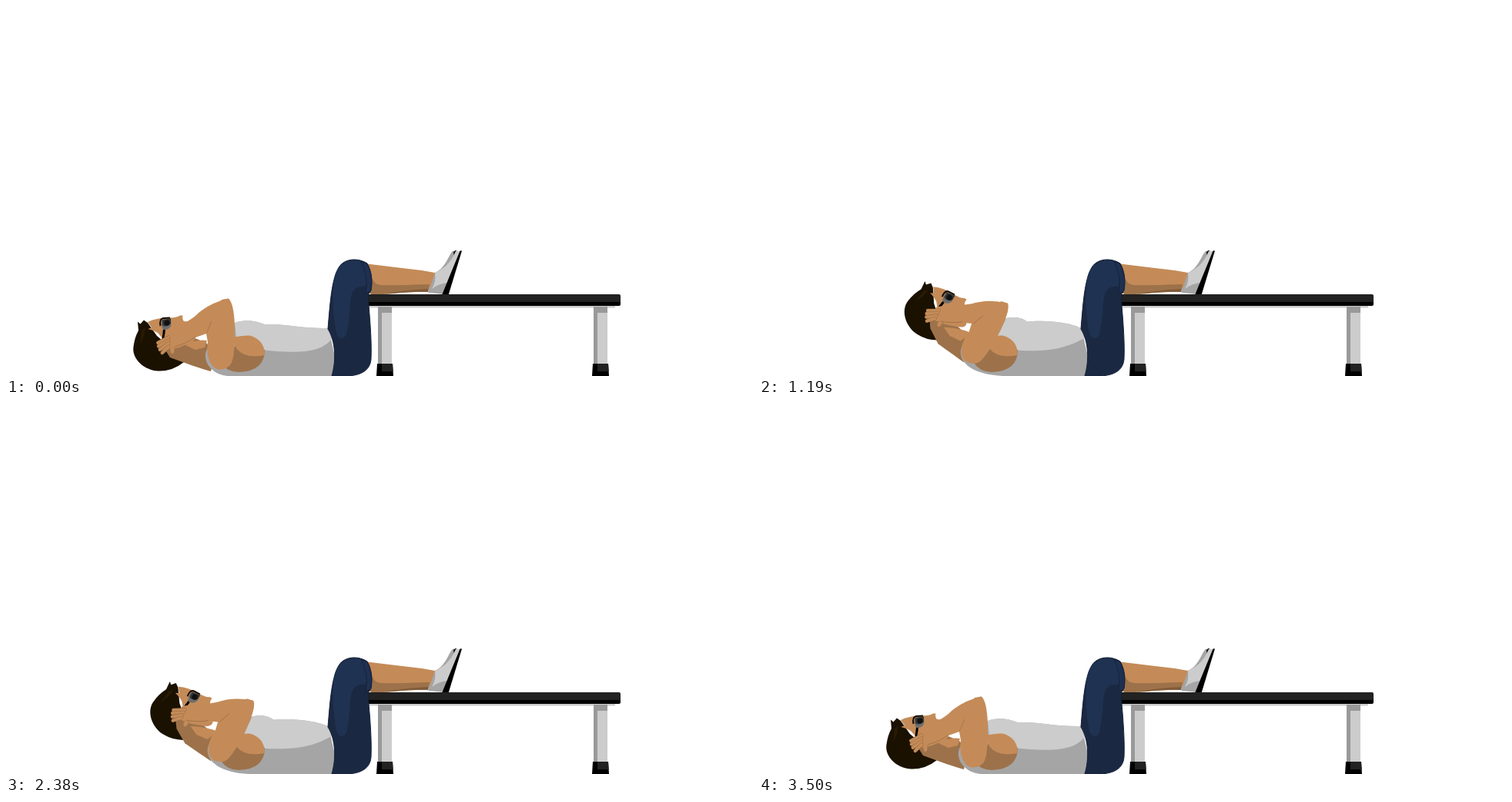
An HTML page for the animation above (3570 ms loop, 970 by 480 pixels).

```html
<!DOCTYPE html>
<html lang="en">
<head>
<meta charset="utf-8">
<title>Crunch with legs on a bench</title>
<style>
html, body { margin: 0; width: 100%; height: 100%; overflow: hidden; background: #fff; }
svg { display: block; width: 970px; height: 480px; }
.skin { fill: #c48b58; }
.shade { fill: #9d724a; }
.crease { fill: none; stroke: #8f6440; stroke-width: .6; }
</style>
</head>
<body>
<svg viewBox="0 0 970 480" xmlns="http://www.w3.org/2000/svg">
  <defs>
    <g id="post">
      <path fill="#ccc" d="M483 390h18v75h-18z"/>
      <path fill="#999" d="M483 390h18v8h-13v67h-5z"/>
      <path fill="#000" d="M482 464h20l1 16h-22z"/>
      <path fill="#222" d="M488 464h14l.6 10h-14.6z"/>
    </g>
  </defs>

  <g id="hair">
    <path fill="#1a1100" d="M231 462Q216 474 198 473.500C180 473 163 458 165.500 442Q167 430 172 421L171 409.500L174.500 412.500L179 407.500L184 411L196 428L216 445Z"/>
    <path fill="#291a04" d="M176 421L181 417L179 428L174 440Z"/>
  </g>
  <path id="neck" class="shade"/>
  <g id="face">
    <path class="skin" d="M184 410L189 417L184.500 419L191 421L197 424L203 431L199 445Q215 448 232 440Q246 436 246 430Q244 420 239 412L237 409.500L231 409Q228.500 406 229.500 401.500L226 401.500Q222 404.500 212 404.500Q196 404 184 410Z"/>
    <path fill="#6e6e6e" d="M202 407L214 405L214.500 414Q212 421 204 420Q201 414 202 407Z"/>
    <path fill="#333" d="M203 407L214 405.500L214 412Q208 418 203 414Z"/>
    <circle cx="209" cy="411" r="3.600" fill="#111"/>
    <path fill="none" stroke="#140d00" stroke-width="2" d="M200.500 415Q199 406 204 405L213 404.500"/>
    <path fill="none" stroke="#000" stroke-width="3" d="M205.500 420L204 432"/>
    <ellipse class="skin" cx="216" cy="446" rx="3" ry="5.500" stroke="#9d724a" stroke-width=".7"/>
  </g>
  <path id="throat" class="skin"/>
  <path id="torso" fill="#a5a5a5"/>
  <path id="chest" fill="#ccc"/>

  <path class="shade" d="M280 464Q286 474 302 475Q336 474 336 446L300 438Z"/>
  <path class="skin" d="M293 430Q308 427 316 427.500C328 430 337 440 335.500 453Q310 458 299 444Z"/>

  <g id="arm">
    <path class="skin" d="M280 381L289 379.500Q296 386 297 415C297 445 296 462 290 467Q278 476 268 467Q259 455 262 436L260 425L268 405Z"/>
    <g id="forearm">
      <path class="skin" d="M288 379.500Q262 386 246 402Q236 410 222 416L206 427L203 447L218 443Q236 437 246 430L260 425L268 408L294 390Z"/>
      <path class="crease" d="M219 442Q236 437 246 429M260 425L267 409"/>
    </g>
  </g>

  <path class="skin" d="M465 334L540 343L557 346Q559 354 556 364L548 370L474 374Z"/>
  <path class="shade" d="M474 345C475 354 477 361 487 362C510 363 530 361 550 361L548 371C528 370 500 374 476 374.500L471 372Z"/>
  <path fill="#805b39" d="M490 374Q520 368 549 367L548 371Q520 370 490 374Z"/>
  <path fill="#a5a5a5" d="M557 346C571 340 574 324 580 318L585 317L578 347L570 374L549 372Q546 370 551 364Z"/>
  <path fill="#000" d="M581 319L585 316.500L582 325Z"/>
  <path fill="#ccc" d="M557 346C574 339 580 327 584 318L589 318L573 359Q562 360 553 367Q559 357 557 346Z"/>
  <path fill="#000" d="M589.500 317.500L592 317.500L574.500 375L566 375Z"/>

  <path fill="#ccc" d="M470 388h321v3.500h-321z"/>
  <use href="#post"/>
  <use href="#post" x="280"/>
  <path fill="#000" d="M469 382h329v5q0 2-2 2h-327z"/>
  <path fill="#222" d="M469 374h327q2 0 2 2v8h-329z"/>

  <path fill="#1a2941" stroke="#14203a" d="M418 419C421 385 423 342 438 333C447 327 460 328 469 334C475 344 476 358 474 369L470.500 374L471 389C473 410 475 440 474 458C473 472 462 480 440 480L423 480C429 460 428 435 418 419Z"/>
  <path fill="#1f3252" d="M427 350C432 335 443 330 455 330C462 331 465 335 466 338C469 350 469 358 467 364C455 362 448 368 447 385C446 405 444 418 442 426C438 434 432 432 429 424C424 400 423 370 427 350Z"/>
  <path fill="#1f3050" stroke="#14203a" stroke-width=".8" d="M461 332L468.500 334C475 345 476 358 473.500 370L467 373Q471 350 461 332Z"/>
</svg>
<script>
const STEP = 70, LOOP = 3570, TOP = 1750, BRAKE = 1120, PEAK = 1.04;
const $ = id => document.getElementById(id);

// Soft shapes: outline lying down and raised.
const FRONT = ["M297 411C308 407 322 407 337 413.5C355 411 385 419 419 418",
               "M325 404C332 403 344 402 350 409C370 406 412 409 419 419"];
const torso = [FRONT[0] + "L427 455L426 480L288 480C264 478 252 456 263 442Z",
               FRONT[1] + "L427 455L426 480L322 480C270 478 252 455 268 434Z"];
const chest = [FRONT[0] + "L424 430C410 453 370 450 330 446L300 440Z",
               FRONT[1] + "L424 430C395 444 375 449 330 446.5L305 440Z"];
const neck = ["M203 440L213 456L231 462.5Q248 469 266 474L272 450L260 437L243 430L222 430Z",
              "M226 390L225 408L233 431.5Q248 444 266 459L282 440L275 426L260 410L240 392Z"];
const throat = ["M233 440Q246 432 261 434L258 443L246 446Z",
                "M241 413Q262 415 279 423L262 433L248 425Z"];

const mix = (a, b, u) => a + (b - a) * u;

function morph(id, [low, high], u) {
  const ends = high.match(/[\d.]+/g);
  let i = 0;
  $(id).setAttribute("d", low.replace(/[\d.]+/g, n => mix(+n, +ends[i++], u).toFixed(2)));
}

// Turns a rigid part about a joint that moves by (dx, dy).
function pose(id, x, y, dx, dy, angle, scale = 1) {
  $(id).setAttribute("transform",
    `translate(${x + dx} ${y + dy}) rotate(${angle}) scale(${scale}) translate(${-x} ${-y})`);
}

function addFingers() {
  let svg = "";
  for (let i = 0; i < 4; i++) {
    const d = `M211 ${430 + 4 * i}L${197.5 + 0.6 * i * i} ${437 + 4.3 * i}`;
    svg += `<path d="${d}" stroke="#8f6440" stroke-width="4.8"/>
            <path d="${d}" stroke="#c48b58" stroke-width="4.1"/>`;
  }
  $("forearm").insertAdjacentHTML("beforeend", `<g stroke-linecap="round">${svg}</g>`);
}

// Steady rise, then slowing to rest at the top; the way down mirrors it.
function lift(t) {
  const rest = TOP - Math.abs(t - TOP);
  const span = TOP - BRAKE;
  const speed = PEAK / (BRAKE + span / 2);
  if (rest <= BRAKE) return speed * rest;
  return PEAK - speed * span / 2 * ((TOP - rest) / span) ** 2;
}

function draw(ms) {
  const u = lift(Math.floor((ms % LOOP) / STEP) * STEP);
  morph("torso", torso, u);
  morph("chest", chest, u);
  morph("throat", throat, u);
  morph("neck", neck, u ** 1.6);
  for (const id of ["hair", "face"]) pose(id, 208, 412, 44 * u, -39 * u, 36.5 * u);
  pose("arm", 282, 455, -u, -7 * u, 33 * u);
  pose("forearm", 288, 383, 0, 0, -1.5 * u, 1 - 0.04 * u);
}

addFingers();
const start = performance.now();
function tick() {
  draw(performance.now() - start);
  requestAnimationFrame(tick);
}
draw(0);
requestAnimationFrame(tick);
</script>
</body>
</html>
```
